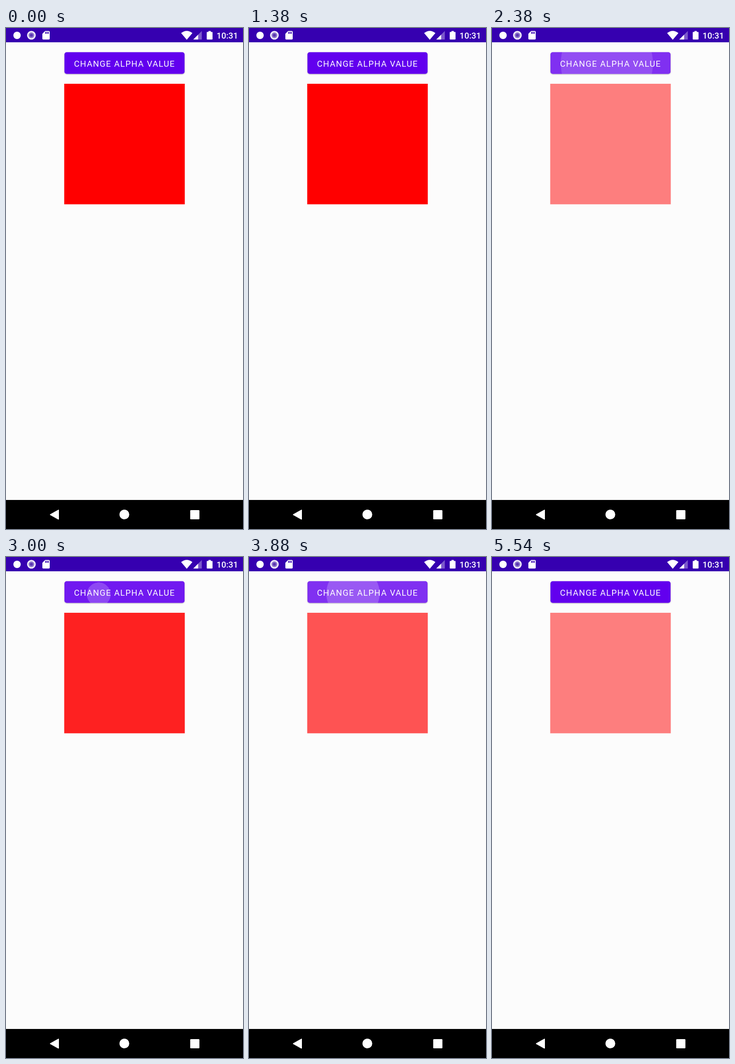
Animation of 515x1087 px, one loop 5.75 s. Source, as an HTML page:

```html
<!DOCTYPE html>
<html lang="en">
<head>
<meta charset="utf-8">
<title>Change alpha value</title>
<style>
  html, body { margin: 0; width: 100%; height: 100%; overflow: hidden; background: #fcfcfc; }
  svg { display: block; width: 100%; height: 100%; font-family: Roboto, sans-serif; }
  :root { --loop: 5750ms; }

  .square { fill: #f00; animation: alpha var(--loop) infinite cubic-bezier(.37, 0, .63, 1); }
  /* Each tap fades the square for 300 ms */
  @keyframes alpha {
    0%, 36.348% { opacity: 1; }
    41.565%, 43.478% { opacity: .5; }
    48.696%, 50.4% { opacity: 1; }
    55.617%, 56.174% { opacity: .5; }
    61.391%, 64.348% { opacity: 1; }
    69.565%, 100% { opacity: .5; }
  }

  .tap * { animation: var(--loop) linear var(--at) infinite backwards; }
  .tap .tint { fill: #fff; opacity: 0; animation-name: tint; }
  .tap .origin { animation-name: drift; }
  .tap .wave { fill: #fff; opacity: 0; animation-name: grow, fade; }

  @keyframes tint {
    0% { opacity: 0; }
    2.087%, 4.1% { opacity: .19; }
    6.087%, 100% { opacity: 0; }
  }
  @keyframes drift {
    0% { transform: translate(180px, 83px); animation-timing-function: cubic-bezier(.33, .48, .67, .96); }
    5.461%, 100% { transform: translate(257.5px, 76px); }
  }
  @keyframes grow {
    0% { transform: scale(0); }
    5.461%, 100% { transform: scale(1); }
  }
  @keyframes fade {
    0%, 3.478% { opacity: .2; }
    6.087%, 100% { opacity: 0; }
  }
</style>
</head>
<body>
<svg viewBox="0 0 515 1087" preserveAspectRatio="none">
  <defs>
    <clipPath id="buttonShape"><rect x="127" y="52.5" width="261" height="47" rx="5"/></clipPath>
    <filter id="shadow" x="-5%" y="-20%" width="110%" height="150%">
      <feDropShadow dx="0" dy="1" stdDeviation="1.3" flood-color="#000" flood-opacity=".32"/>
    </filter>
  </defs>

  <rect width="515" height="1087" fill="#fcfcfc"/>

  <!-- Status bar -->
  <rect width="515" height="31" fill="#3600b0"/>
  <g fill="#fff">
    <circle cx="24" cy="16" r="8"/>
    <circle cx="55.2" cy="15.8" r="9.5" fill="#eeeaf7"/>
    <circle cx="55.2" cy="15.8" r="6.2" fill="#8f78cb"/>
    <circle cx="55.2" cy="15.8" r="3.3" fill="#5a35b3"/>
    <path d="M85 6.5h8q2 0 2 2v14.5q0 2-2 2H81q-2 0-2-2V12.500z"/>
    <path d="M85 8.500h2v4h-2zm3 0h2v4h-2zm3 0h2v4h-2z" fill="#3600b0"/>
    <path d="M380.500 11Q392.800 1.500 405 11L392.800 25.500z"/>
    <path d="M425.500 6.500V25H407z" opacity=".35"/>
    <path d="M417.500 14.500V25H407z"/>
    <path d="M440 6.500h5v2h2.500q1.300 0 1.300 1.300v14q0 1.300-1.300 1.300h-10q-1.300 0-1.300-1.300v-14q0-1.300 1.300-1.300H440z"/>
    <text x="457.500" y="22.800" font-size="18.400" font-weight="500">10:31</text>
  </g>

  <!-- Button -->
  <rect x="127" y="52.5" width="261" height="47" rx="5" fill="#6200ee" filter="url(#shadow)"/>
  <g clip-path="url(#buttonShape)" id="taps"></g>
  <text x="147.800" y="83.500" font-size="18.300" letter-spacing="1.380" fill="#fff">CHANGE ALPHA VALUE</text>

  <rect class="square" x="126.500" y="121" width="262" height="261.500"/>

  <!-- Navigation bar -->
  <rect y="1024" width="515" height="63" fill="#000"/>
  <g fill="#fff">
    <path d="M96.500 1055.800L114 1046v19.600z" stroke="#fff" stroke-width="2" stroke-linejoin="round"/>
    <circle cx="257.200" cy="1055.500" r="10.600"/>
    <rect x="400.300" y="1046" width="20" height="20" rx="1.500"/>
  </g>
</svg>
<script>
  const rippleStarts = [2144, 2544, 2940, 3274, 3744];
  document.getElementById('taps').innerHTML = rippleStarts.map(ms => `
    <g class="tap" style="--at:${ms}ms">
      <rect class="tint" x="127" y="52" width="261" height="48"/>
      <g class="origin"><circle class="wave" r="132.8"/></g>
    </g>`).join('');
</script>
</body>
</html>
```
